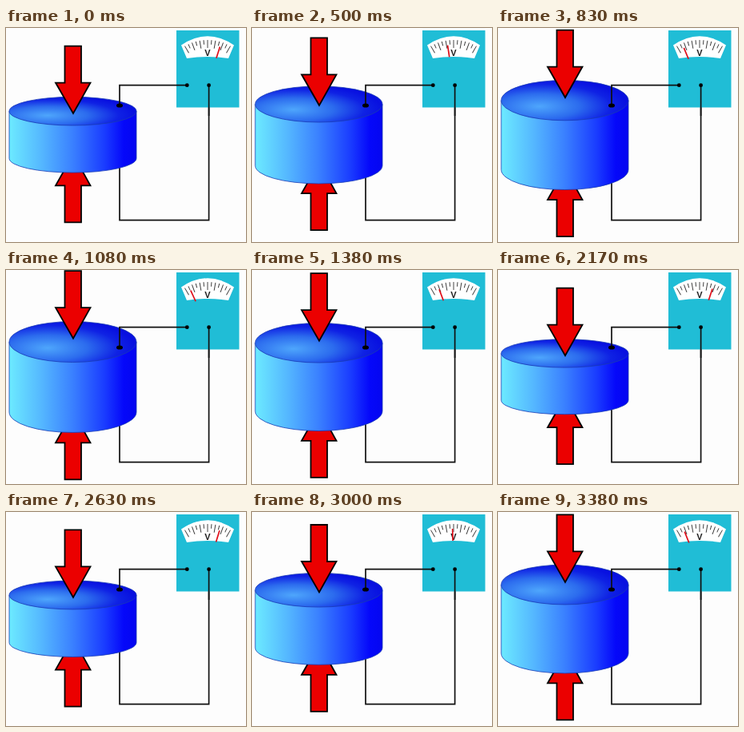
Recreate the animation shown at these times as an HTML page. Size 300x268 px, loop 3430 ms.

```html
<!DOCTYPE html>
<html lang="en">
<head>
<meta charset="utf-8">
<title>Piezoelectric disc</title>
<style>
  html, body { margin: 0; width: 100%; height: 100%; overflow: hidden; background: #fdfdfd; }
  svg { display: block; width: 300px; height: 268px; }
  text { font: bold 11px "Liberation Sans", Arial, sans-serif; fill: #222; }
  .arrow { fill: #eb0000; stroke: #000; stroke-width: 1.8; }
  .wire { fill: none; stroke: #111; stroke-width: 1.7; }
  .rim { stroke: #1a3cb4; stroke-width: .8; }
</style>
</head>
<body>
<svg viewBox="0 0 300 268">
  <defs>
    <linearGradient id="side" x2="1" y2="0">
      <stop offset="0" stop-color="#6ceaff"/>
      <stop offset=".25" stop-color="#55b8ff"/>
      <stop offset=".5" stop-color="#3a80ff"/>
      <stop offset=".75" stop-color="#1a3cff"/>
      <stop offset=".9" stop-color="#0508fa"/>
      <stop offset="1" stop-color="#0406f0"/>
    </linearGradient>
    <radialGradient id="lid" cx=".3" cy=".65" r=".7">
      <stop offset="0" stop-color="#4ea6fc"/>
      <stop offset=".45" stop-color="#2c6cee"/>
      <stop offset=".8" stop-color="#0f22e4"/>
      <stop offset="1" stop-color="#0810e0"/>
    </radialGradient>
  </defs>
  <path id="push" class="arrow" d="M73.500 0H94V-46H105.500L84-85 62-46H73.500Z"/>
  <path class="wire" d="M253.600 72V240.600H142V150"/>
  <path id="body" class="rim" fill="url(#side)"/>
  <ellipse id="top" class="rim" cx="83.500" rx="79.500" fill="url(#lid)"/>
  <rect x="213" y="3" width="78.500" height="96.500" fill="#20bdd6"/>
  <path d="M219 21.500Q252-1 285 21.500L278 38Q252 34 226 38Z" fill="#fff"/>
  <g id="ticks" stroke="#333" stroke-width=".9"></g>
  <text x="251.800" y="35" text-anchor="middle">V</text>
  <path id="needle" d="M252 21V36" stroke="#e00d18" stroke-width="1.7"/>
  <path class="wire" d="M253.600 72V110M226 71.600H142V97"/>
  <circle cx="226.300" cy="71.700" r="2.400"/>
  <circle cx="253.600" cy="71.700" r="2.400"/>
  <ellipse cx="142" cy="97" rx="4" ry="2.600"/>
  <path id="press" class="arrow" d="M73.500 0H94V46H105.500L84 84.500 62 46H73.500Z"/>
</svg>
<script>
  const LOOP = 3430, SWING = 2600, PEAK = 1065, SOFTNESS = 1.25;
  const el = id => document.getElementById(id);
  const set = (id, attrs) => {
    for (const name in attrs) el(id).setAttribute(name, attrs[name]);
  };

  for (let i = -6; i <= 6; i++) {
    const inner = i % 2 ? 20.5 : 25;
    el("ticks").innerHTML += `<path d="M252 15V${inner}" transform="rotate(${i * 5} 252 72)"/>`;
  }

  // 1 = fully expanded, -1 = fully compressed, lingering at both ends
  function stretch(t) {
    const swing = Math.cos((t - PEAK) / SWING * 2 * Math.PI);
    return Math.sin(SOFTNESS * swing) / Math.sin(SOFTNESS);
  }

  function draw(t) {
    const s = stretch(t);
    const lidTop = 75.9 - 11.4 * s;
    const base = 191.8 + 11.7 * s;
    const ry = 21.5 + 4 * s;
    const lidY = lidTop + ry;

    set("top", { cy: lidY, ry });
    set("body", { d: `M4 ${lidY}V${base - ry}A79.5 ${ry} 0 0 0 163 ${base - ry}V${lidY}Z` });
    set("press", { transform: `translate(0 ${15.5 - 10.9 * s - 3.5 * s * s})` });
    set("push", { transform: `translate(0 ${250.4 + 9.7 * s + 2.2 * s * s})` });
    set("needle", { transform: `rotate(${-2.5 - 22 * s} 252 72)` });
  }

  function tick() {
    draw(performance.now() % LOOP);
    requestAnimationFrame(tick);
  }
  tick();
</script>
</body>
</html>
```
